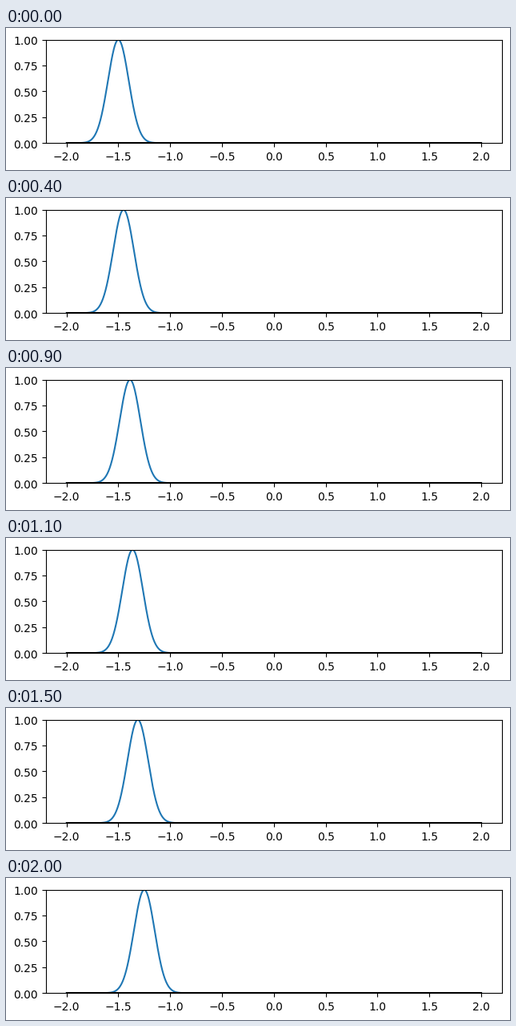
These frames come from a looping animation (630x178 px, 2.1 s). A matplotlib script:

```python
import numpy as np
import matplotlib.pyplot as plt
from matplotlib.animation import FuncAnimation
from matplotlib.transforms import ScaledTranslation

W, H, DPI = 630, 178, 100
FRAMES, INTERVAL = 21, 100
START, STEP, SIGMA = -1.5, 0.0125, 0.1

x = np.linspace(-2, 2, 1001)


def pulse(center):
    return np.exp(-((x - center) / SIGMA) ** 2 / 2)


fig = plt.figure(figsize=(W / DPI, H / DPI), dpi=DPI)
ax = fig.add_axes([49.72 / W, 33.72 / H, 570.28 / W, 129.58 / H])
line, = ax.plot(x, pulse(START))
ax.plot(x, np.zeros_like(x), color="black")
ax.set(xlim=(-2.2, 2.2), ylim=(0, 1),
       xticks=np.arange(-2, 2.1, 0.5), yticks=np.arange(0, 1.1, 0.25))

# The labels sit a fraction of a pixel below their ticks.
drop = ScaledTranslation(0, -0.8 / DPI, fig.dpi_scale_trans)
for label in ax.get_xticklabels() + ax.get_yticklabels():
    label.set_transform(label.get_transform() + drop)


def update(i):
    line.set_ydata(pulse(START + STEP * i))
    return line,


anim = FuncAnimation(fig, update, frames=FRAMES, interval=INTERVAL,
                     repeat=True, repeat_delay=0)
plt.show()
```
